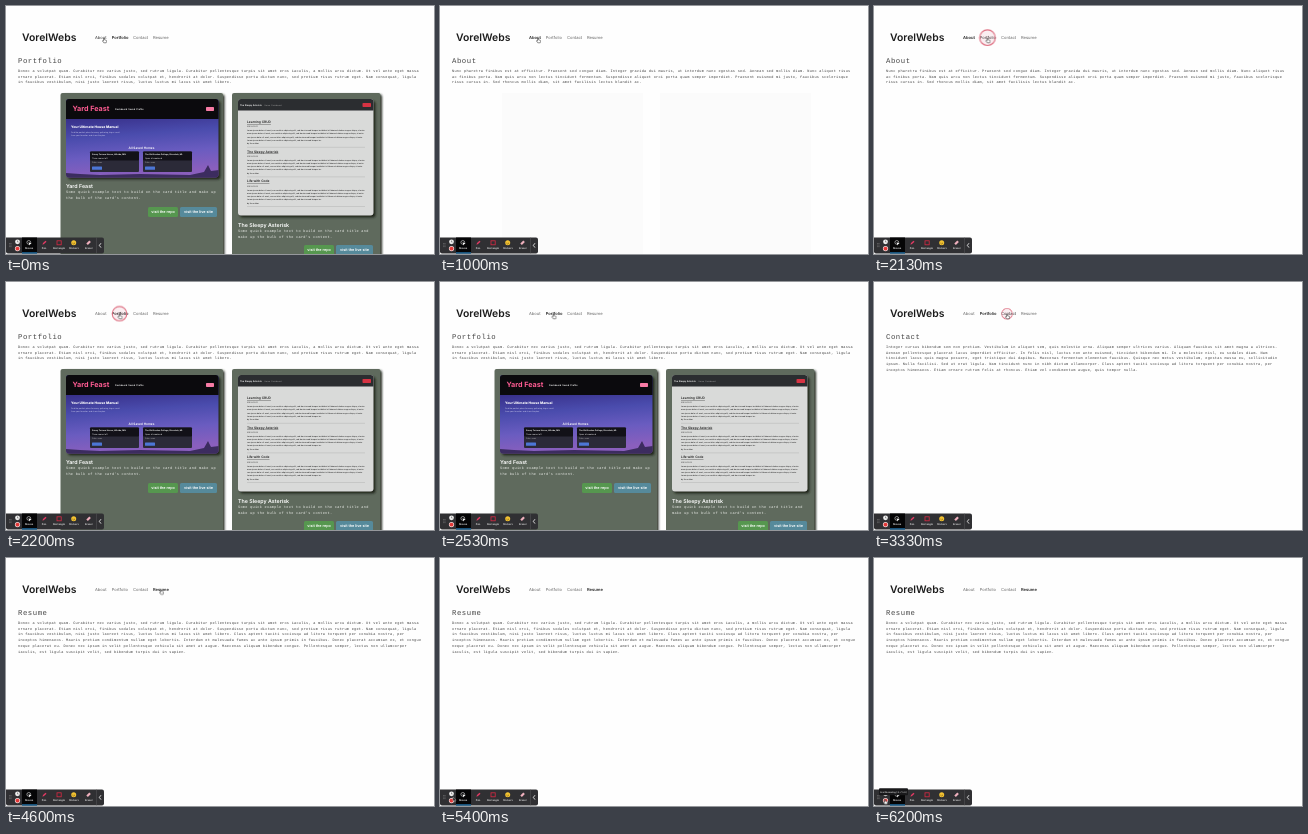
An HTML page for the animation above (6260 ms loop, 428 px wide and 248 px high).

```html
<!DOCTYPE html>
<html lang="en">
<head>
<meta charset="utf-8">
<title>Portfolio site demo</title>
<style>
  html, body { margin: 0; width: 100%; height: 100%; overflow: hidden; background: #fefefe; }
  svg { display: block; width: 100%; height: 100%; }
  text { font-family: Inter, "Open Sans", sans-serif; text-rendering: geometricPrecision; white-space: pre; }
  .logo { font-size: 10.4px; font-weight: 600; fill: #1c1c1c; }
  .title { font: 7.3px "Liberation Mono", monospace; letter-spacing: .54px; fill: #444; }
  .copy { font: 3.55px "Liberation Mono", monospace; letter-spacing: .272px; fill: #3c3c3c; }
  .card .copy { fill: #eef0ec; letter-spacing: .29px; }
  .head { font-size: 5.3px; font-weight: 600; fill: #fff; }
  .btn { font-size: 3.75px; font-weight: 600; fill: #fff; text-anchor: middle; }
  .tool { font-size: 2.5px; font-weight: 600; fill: #ddd; text-anchor: middle; }
  .post { font-size: 3.25px; font-weight: 600; fill: #222; text-decoration: underline; }
  .link { font-size: 4.1px; fill: #666; }

  /* One loop: clicks land at 1000, 2200, 3320 and 4200 ms */
  .page, .ghost, .link, .hand, .arrow, .tip { animation: 6260ms step-end infinite; }
  .page, .ghost, .arrow, .tip { opacity: 0; }
  #portfolio { animation-name: portfolio; }
  #about { animation-name: about; }
  #contact { animation-name: contact; }
  #resume { animation-name: resume; }
  .ghost { animation-name: ghost; }
  @keyframes portfolio { 0%, 35.14% { opacity: 1 } 15.97%, 53.03%, 100% { opacity: 0 } }
  @keyframes about { 0%, 35.14%, 100% { opacity: 0 } 15.97% { opacity: 1 } }
  @keyframes contact { 0%, 67.09%, 100% { opacity: 0 } 53.03% { opacity: 1 } }
  @keyframes resume { 0% { opacity: 0 } 67.09%, 100% { opacity: 1 } }
  @keyframes ghost { 0%, 16.9%, 100% { opacity: 0 } 15.97% { opacity: 1 } }

  .l0 { animation-name: link0; }
  .l1 { animation-name: link1; }
  .l2 { animation-name: link2; }
  .l3 { animation-name: link3; }
  @keyframes link0 { 0% { fill: #333 } 15.97% { fill: #222; font-weight: 600 } 35.14%, 100% { fill: #666; font-weight: 400 } }
  @keyframes link1 {
    0%, 35.14% { fill: #222; font-weight: 600 }
    15.97% { fill: #666; font-weight: 400 }
    30.5% { fill: #333; font-weight: 400 }
    54.15%, 100% { fill: #666; font-weight: 400 }
  }
  @keyframes link2 { 0% { fill: #666 } 44.5% { fill: #333; font-weight: 400 } 54.15% { fill: #222; font-weight: 600 } 67.09%, 100% { fill: #666; font-weight: 400 } }
  @keyframes link3 { 0% { fill: #666 } 61.5% { fill: #333; font-weight: 400 } 67.09%, 100% { fill: #222; font-weight: 600 } }

  .pointer { animation: travel 6260ms ease-in-out infinite; }
  @keyframes travel {
    0%, 26.2% { transform: translate(98px, 32px) }
    31.95%, 41.5% { transform: translate(113.5px, 32px) }
    45.7%, 57.5% { transform: translate(133px, 32px) }
    62.8%, 73.6% { transform: translate(155px, 31.5px) }
    77.6%, 79.1% { transform: translate(38px, 203px) }
    87.9%, 100% { transform: translate(11px, 241.5px) }
  }
  .hand { animation-name: hand; }
  .arrow { animation-name: arrow; }
  .tip { animation-name: tip; }
  @keyframes hand { 0%, 87% { opacity: 1 } 74% { opacity: 0 } }
  @keyframes arrow { 0%, 87%, 100% { opacity: 0 } 74% { opacity: 1 } }
  @keyframes tip { 0% { opacity: 0 } 90.4%, 100% { opacity: 1 } }
  .ring { animation: press 6260ms linear infinite; }
  @keyframes press {
    0%, 32.9%, 37.2%, 51.1%, 54.3%, 65.2%, 69%, 100% { transform: scale(0) }
    34%, 35%, 52.1%, 52.7%, 66.1%, 67.1% { transform: scale(1) }
  }
</style>
</head>
<body>
<svg viewBox="0 0 428 248" preserveAspectRatio="none">
  <defs>
    <linearGradient id="sky" x1="0" y1="0" x2=".15" y2="1">
      <stop offset=".25" stop-color="#38308a"/>
      <stop offset=".5" stop-color="#4a4cad"/>
      <stop offset=".75" stop-color="#6a5cc0"/>
      <stop offset="1" stop-color="#8a5fbd"/>
    </linearGradient>
    <filter id="soft" x="-10%" y="-10%" width="120%" height="120%"><feGaussianBlur stdDeviation=".9"/></filter>
    <clipPath id="shot"><rect x="60" y="93" width="152.5" height="78.5" rx="3"/></clipPath>
  </defs>
  <rect width="428" height="248" fill="#fefefe"/>

  <text class="logo" x="16" y="34.5">VorelWebs</text>
  <g id="nav"></g>

  <g class="ghost" fill="#fbfbfb">
    <rect x="62" y="87" width="141" height="161"/>
    <rect x="220" y="87" width="151" height="161"/>
  </g>

  <g id="about" class="page"></g>
  <g id="contact" class="page"></g>
  <g id="resume" class="page"></g>
  <g id="portfolio" class="page">
    <g class="card">
      <rect x="57" y="88.5" width="161.5" height="170" rx="2" fill="#20281f" filter="url(#soft)"/>
      <rect x="54.5" y="87" width="162.5" height="170" rx="2" fill="#5f6a5d"/>
      <rect x="62" y="95" width="152.5" height="78.5" rx="3" fill="#20281f" filter="url(#soft)"/>
      <g clip-path="url(#shot)">
        <rect x="60" y="93" width="153" height="79" fill="url(#sky)"/>
        <path d="M60 172v-5l14 1 20 1 40-1 50 1 14-3 4-7 3 6 8-1v8z" fill="#2a2048" opacity=".8"/>
        <rect x="60" y="93" width="153" height="20" fill="#0b0a0d"/>
        <text x="66.5" y="105" font-size="7.2" font-weight="700" fill="#ff5c93">Yard Feast</text>
        <text x="109" y="104.3" font-size="2.3" font-weight="600" fill="#eee">Dashboard  Saved  Profile</text>
        <rect x="200" y="101" width="8" height="4" rx=".8" fill="#f77ba5"/>
        <text x="65" y="122.4" font-size="3.4" font-weight="800" fill="#fff">Your Ultimate House Manual</text>
        <g font-size="1.9" fill="#c9c9ec">
          <text x="65" y="126.5">Find the perfect place for every gathering, big or small.</text>
          <text x="65" y="130">Save your favorites and share the plan.</text>
        </g>
        <text x="135.5" y="143.3" text-anchor="middle" font-size="3.2" font-weight="600" fill="#fff">All Saved Homes</text>
        <g id="homes"></g>
      </g>
      <text class="head" x="60" y="182.3">Yard Feast</text>
      <text class="copy" x="60" y="187.3">Some quick example text to build on the card title and make up</text>
      <text class="copy" x="60" y="193.2">the bulk of the card's content.</text>
      <g class="buttons" transform="translate(142 201)"></g>
    </g>
    <g class="card">
      <rect x="228.5" y="88.5" width="147.5" height="170" rx="2" fill="#20281f" filter="url(#soft)"/>
      <rect x="226" y="87" width="148.5" height="170" rx="2" fill="#5f6a5d"/>
      <rect x="234" y="95" width="135.5" height="116.5" rx="3" fill="#20281f" filter="url(#soft)"/>
      <rect x="232" y="93" width="135.5" height="116.5" rx="3" fill="#d9dad9"/>
      <path d="M232 104.5V96a3 3 0 0 1 3-3h129.5a3 3 0 0 1 3 3v8.5z" fill="#2b2d30"/>
      <text x="234" y="99.8" font-size="2.25" font-weight="600" fill="#fff">The Sleepy Asterisk</text>
      <text x="258.5" y="99.8" font-size="2" fill="#999">Home  Dashboard</text>
      <rect x="356.5" y="97" width="8.5" height="4" rx=".7" fill="#d63343"/>
      <g id="posts"></g>
      <text class="head" x="232" y="220.8">The Sleepy Asterisk</text>
      <text class="copy" x="232" y="226.2">Some quick example text to build on the card title and</text>
      <text class="copy" x="232" y="232.1">make up the bulk of the card's content.</text>
      <g class="buttons" transform="translate(298 239)"></g>
    </g>
  </g>

  <g id="toolbar">
    <path d="M0 231.5h96a2 2 0 0 1 2 2v12a2 2 0 0 1-2 2H2a2 2 0 0 1-2-2z" fill="#303033"/>
    <rect x="16" y="231.5" width="15" height="16" fill="#050506"/>
    <rect x="16" y="246.4" width="15" height="1.1" fill="#2585c8"/>
    <path d="M90.5 231.5v16" stroke="#56565a" stroke-width=".5"/>
    <path d="M3.7 237v5M5 237v5" stroke="#999" stroke-width=".7" stroke-dasharray=".7 1"/>
    <circle cx="11.5" cy="235.8" r="2.4" fill="#eee"/>
    <path d="M11.5 234.5v1.5h1" fill="none" stroke="#444" stroke-width=".5"/>
    <circle cx="11.5" cy="242.6" r="2.6" fill="#f3d5d5"/>
    <circle cx="11.5" cy="242.6" r="1.9" fill="#e23838"/>
    <circle cx="22.8" cy="236.4" r="1.9" fill="none" stroke="#ddd" stroke-width=".6"/>
    <path d="M22.5 236.2l3.2 1.3-1.4.5-.6 1.4z" fill="#fff"/>
    <path d="M36.5 238.7l.5-1.7 2.5-2.3 1 1-2.5 2.4z" fill="#e53964"/>
    <rect x="51" y="234.8" width="4.2" height="4" fill="none" stroke="#d92943" stroke-width=".8"/>
    <circle cx="67.7" cy="236.8" r="2.5" fill="#f5c431"/>
    <path d="M66.5 237.3q1.2 1.5 2.4 0M66.9 236v.3M68.5 236v.3" fill="none" stroke="#5d4314" stroke-width=".5"/>
    <path d="M80.3 237.5l3-3 1.6 1.5-3 3z" fill="#efb0bd"/>
    <path d="M95 237.2l-1.7 2.2 1.7 2.2" fill="none" stroke="#fff" stroke-width=".8"/>
    <g id="tools"></g>
  </g>

  <g class="tip">
    <rect x="5" y="230.3" width="29" height="7" rx="1" fill="#19191b"/>
    <text x="19.5" y="234.7" text-anchor="middle" font-size="2.25" fill="#f2f2f2">End Recording (⇧+⌥+E)</text>
  </g>

  <g class="pointer">
    <circle class="ring" cy="-.3" r="7.8" fill="#cf3355" fill-opacity=".08" stroke="#de7183" stroke-width="1.2"/>
    <path class="hand" d="M-.5.2q.5-.5 1 0v1.6l1.8.5q.5.2.4.9l-.5 1.6h-2.4l-1.5-1.9q.1-.7 1.2 0z" fill="#fff" stroke="#222" stroke-width=".5" stroke-linejoin="round"/>
    <path class="arrow" d="M0 0v4.4l1-.9.7 1.6.7-.3-.7-1.5h1.4z" fill="#111" stroke="#fff" stroke-width=".35"/>
  </g>
</svg>
<script>
  const pick = selector => document.querySelector(selector);
  const add = (el, markup) => el.insertAdjacentHTML('beforeend', markup);
  const text = (cls, x, y, words) => `<text class="${cls}" x="${x}" y="${y}">${words}</text>`;

  const opening = [
    'Donec a volutpat quam. Curabitur nec varius justo, sed rutrum ligula. Curabitur pellentesque turpis sit amet eros iaculis, a mollis arcu dictum. Ut vel ante eget massa',
    'ornare placerat. Etiam nisl orci, finibus sodales volutpat et, hendrerit at dolor. Suspendisse porta dictum nunc, sed pretium risus rutrum eget. Nam consequat, ligula'
  ];
  const vestibulum = 'in faucibus vestibulum, nisi justo laoreet risus, luctus luctus mi lacus sit amet libero.';
  const pages = {
    Portfolio: [...opening, vestibulum],
    About: [
      'Nunc pharetra finibus est at efficitur. Praesent sed congue diam. Integer gravida dui mauris, ut interdum nunc egestas sed. Aenean sed mollis diam. Nunc aliquet risus',
      'ac finibus porta. Nam quis arcu non lectus tincidunt fermentum. Suspendisse aliquet orci porta quam semper imperdiet. Praesent euismod mi justo, faucibus scelerisque',
      'risus cursus in. Sed rhoncus mollis diam, sit amet facilisis lectus blandit ac.'
    ],
    Contact: [
      'Integer cursus bibendum sem non pretium. Vestibulum in aliquet sem, quis molestie urna. Aliquam semper ultrices varius. Aliquam faucibus sit amet magna a ultrices.',
      'Aenean pellentesque placerat lacus imperdiet efficitur. In felis nisl, luctus non ante euismod, tincidunt bibendum mi. In a molestie nisl, eu sodales diam. Nam',
      'tincidunt lacus quis magna posuere, eget tristique dui dapibus. Maecenas fermentum elementum faucibus. Quisque nec metus vestibulum, egestas massa eu, sollicitudin',
      'ipsum. Nulla facilisi. Sed ut erat ligula. Nam tincidunt nunc in nibh dictum ullamcorper. Class aptent taciti sociosqu ad litora torquent per conubia nostra, per',
      'inceptos himenaeos. Etiam ornare rutrum felis at rhoncus. Etiam vel condimentum augue, quis tempor nulla.'
    ],
    Resume: [
      ...opening,
      vestibulum + ' Class aptent taciti sociosqu ad litora torquent per conubia nostra, per',
      'inceptos himenaeos. Mauris pretium condimentum nullam eget lobortis. Interdum et malesuada fames ac ante ipsum primis in faucibus. Donec placerat accumsan ex, et congue',
      'neque placerat eu. Donec nec ipsum in velit pellentesque vehicula sit amet at augue. Maecenas aliquam bibendum congue. Pellentesque semper, lectus non ullamcorper',
      'iaculis, est ligula suscipit velit, sed bibendum turpis dui in sapien.'
    ]
  };
  for (const [name, lines] of Object.entries(pages)) {
    add(pick('#' + name.toLowerCase()), text('title', 12, 57.3, name) +
      lines.map((line, i) => text('copy', 12, 65.6 + i * 5.9, line)).join(''));
  }

  const links = { About: 89, Portfolio: 105.7, Contact: 127, Resume: 147 };
  Object.entries(links).forEach(([name, x], i) => add(pick('#nav'), text('link l' + i, x, 32.5, name)));

  document.querySelectorAll('.buttons').forEach(el => add(el, `
    <rect width="30" height="10" rx="1.5" fill="#56974f"/>${text('btn', 15, 6.3, 'visit the repo')}
    <rect x="32" width="37" height="10" rx="1.5" fill="#568a9b"/>${text('btn', 50.5, 6.3, 'visit the live site')}`));

  ['Mouse', 'Pen', 'Rectangle', 'Stickers', 'Eraser'].forEach((name, i) =>
    add(pick('#tools'), text('tool', 23.2 + i * 14.9, 243.2, name)));

  [84, 137].forEach((x, i) => add(pick('#homes'), `
    <rect x="${x}" y="145.5" width="49" height="20.5" rx="1" fill="#2b2a38"/>
    <rect x="${x}" y="145.5" width="49" height="9" rx="1" fill="#121118"/>
    <g font-size="2" fill="#eee">
      <text x="${x + 2}" y="149.3" font-weight="700">${i ? 'The Old Garden Cottage, Riverdale, ML' : 'Sunny Terrace House, Hillside, MN'}</text>
      <text x="${x + 2}" y="152.6">${i ? 'Open all weekend' : 'Three rooms left'}</text>
      <text x="${x + 2}" y="157.3" fill="#aaa">Date: soon</text>
    </g>
    <rect x="${x + 2}" y="160.5" width="10" height="3.2" rx=".5" fill="#4c76d6"/>`));

  const lorem = 'Lorem ipsum dolor sit amet, consectetur adipiscing elit, sed do eiusmod tempor incididunt ut labore et dolore magna aliqua, ut enim.';
  ['Learning CRUD', 'The Sleepy Asterisk', 'Life with Code'].forEach((name, i) => {
    const y = 117 + i * 29.6;
    const rows = [0, 1, 2, 3].map(row =>
      `<text x="241" y="${y + 8.3 + row * 3.1}">${row < 3 ? lorem.slice(row) : lorem.slice(0, 82)}</text>`).join('');
    add(pick('#posts'), `${text('post', 241, y, name)}
      <g font-size="1.88" font-weight="500" fill="#2c2c2c"><text x="241" y="${y + 4.3}">2023-01-0${i + 1}</text>${rows}
      <text x="241" y="${y + 21.3}">by the author</text></g>
      <path d="M241 ${y + 24.3}h118" stroke="#aaa" stroke-width=".4"/>`);
  });
</script>
</body>
</html>
```
